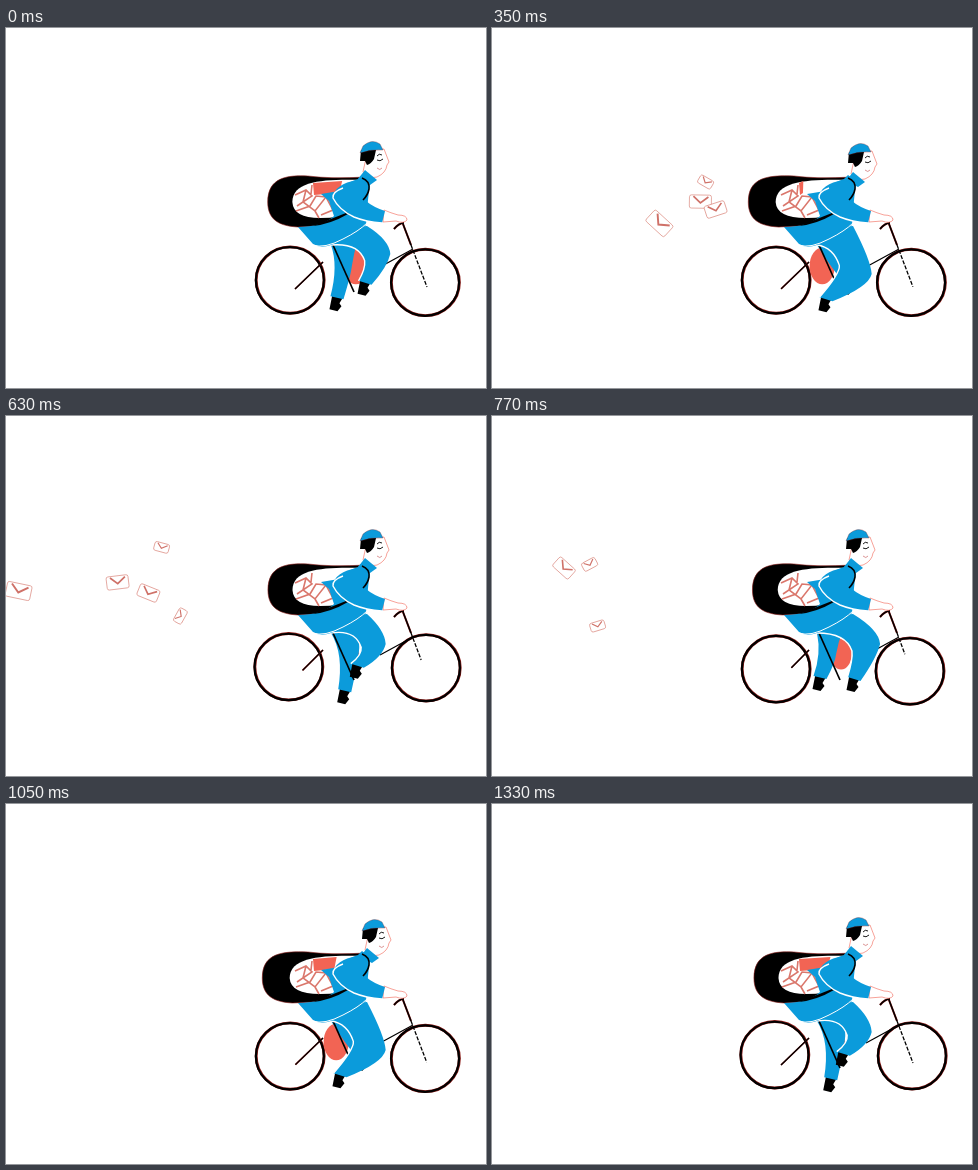
Recreate the animation shown at these times as an HTML page with a canvas. Size 480 px wide and 360 px high, loop 1400 ms.

```html
<!DOCTYPE html>
<html lang="en">
<head>
<meta charset="utf-8">
<title>Postman on a bicycle</title>
<style>
html, body { margin: 0; width: 100%; height: 100%; overflow: hidden; background: #fff; }
canvas { display: block; width: 480px; height: 360px; }
</style>
</head>
<body>
<canvas id="stage" width="480" height="360"></canvas>
<script>
const ctx = document.getElementById('stage').getContext('2d');
const STEP = 70, STEPS = 20, PEDAL_STEPS = 10;
const BLUE = '#0b9bdb', RED = '#f26454', BLACK = '#000', WHITE = '#fff', EDGE = '#8c1c18', PALE = '#dc8c82';
const DRAG = 0.6;

// Letters leave the bag with a speed, are slowed by drag and bent by "bend"; angles in degrees.
const LETTERS = [
  { born: 3, life: 9, x: 252, y: 172, vx: -43.5, vy: 17.3, bend: -2.8, size: 25, tilt: 58, spin: -7.7 },
  { born: 3, life: 7, x: 264, y: 200, vx: -29, vy: -17, bend: 1.9, size: 22, tilt: 5, spin: -2 },
  { born: 4, life: 5, x: 256, y: 186, vx: -33, vy: -4.5, bend: 0, size: 21, tilt: -18, spin: 0 },
  { born: 4, life: 5, x: 256, y: 172, vx: -43, vy: -18, bend: 0, size: 15, tilt: 30, spin: 0 },
  { born: 5, life: 8, x: 286, y: 191, vx: -35, vy: -30.5, bend: 3.9, size: 15, tilt: 101, spin: -21.5 },
  { born: 6, life: 9, x: 257, y: 183, vx: -40, vy: 4.3, bend: -2.1, size: 21, tilt: -8, spin: 10 },
  { born: 7, life: 9, x: 248, y: 190, vx: -38, vy: 5, bend: 0, size: 15, tilt: -105, spin: 22 }
];

function shape(d, fill, stroke, width = 1) {
  const path = new Path2D(d);
  if (fill) { ctx.fillStyle = fill; ctx.fill(path); }
  if (stroke) { ctx.strokeStyle = stroke; ctx.lineWidth = width; ctx.stroke(path); }
}

function ring(x, y, r, color, width) {
  ctx.beginPath();
  ctx.ellipse(x, y, r, r - 0.8, 0, 0, Math.PI * 2);
  ctx.strokeStyle = color;
  ctx.lineWidth = width;
  ctx.stroke();
}

// Cosine wave over the given period, at its peak when step equals peak.
function wave(step, period, peak) {
  return Math.cos((step - peak) / period * Math.PI * 2);
}

function pedal(step, cx, cy) {
  return [cx + 15.5 * wave(step, PEDAL_STEPS, 1), cy + 14 * wave(step, PEDAL_STEPS, 3.5)];
}

function wheel(x, y) {
  ring(x, y, 34, EDGE, 2.9);
  ring(x - 0.3, y + 0.2, 34, BLACK, 2.2);
}

function wheels(step) {
  wheel(283.2 + 1.2 * wave(step, 5, 0.5), 251.7 + 1.2 * wave(step, 5, 1));
  wheel(419 - 1.2 * wave(step, 5, 1.5), 253 + 2.2 * wave(step, 5, 0.7));
}

function letter({ born, life, x, y, vx, vy, bend, size, tilt, spin }, step) {
  const n = step - born;
  if (n < 0 || n >= life) return;
  const w = size, h = size * 0.6;
  ctx.save();
  ctx.translate(x + vx * n + DRAG * n * n, y + vy * n + bend * n * n);
  ctx.rotate((tilt + spin * n) * Math.PI / 180);
  ctx.beginPath();
  ctx.roundRect(-w / 2, -h / 2, w, h, 2);
  ctx.fillStyle = WHITE;
  ctx.fill();
  ctx.strokeStyle = PALE;
  ctx.lineWidth = 0.7;
  ctx.stroke();
  shape(`M${-w * .32} ${-h * .4}L0 ${h * .1}L${w * .36} ${-h * .36}`, null, '#cf7168', size / 13);
  ctx.restore();
}

function bikeFrame(step) {
  const retreat = 0.6 * Math.exp(-(((step - 10.5) / 2.5) ** 2));
  const backX = 289 + 18 * retreat, backY = 261 - 16 * retreat;
  const stemX = 421 - 14 * retreat, stemY = 259 - 36 * retreat;
  shape(`M${backX} ${backY}L317 234`, null, EDGE, 1.7);
  shape(`M${backX} ${backY}L317 234M374 239L407 221`, null, BLACK, 1.2);
  shape('M327 217L348 264', null, BLACK, 1.7);
  shape('M388 201Q393 195 398 195M397 196L405 217', null, EDGE, 2.1);
  shape('M388 201Q393 195 398 195M397 196L405 217', null, BLACK, 1.4);
  ctx.setLineDash([4, 1.5]);
  shape(`M405 217L${stemX} ${stemY}`, null, BLACK, 1.3);
  ctx.setLineDash([]);
}

function foot(x, y) {
  shape(`M${x - 4} ${y - 2}L${x + 6} ${y + 2}L${x + 3} ${y + 7}L${x + 5} ${y + 10}L${x + 1} ${y + 15}
    L${x - 7} ${y + 13}Z`, BLACK);
}

function redLining(step) {
  const show = wave(step, PEDAL_STEPS, 0.3);
  ctx.beginPath();
  ctx.ellipse(340 + 10 * show, 238, 13 * show * show, 19 * show * show, 0, 0, Math.PI * 2);
  ctx.fillStyle = RED;
  ctx.fill();
}

function farLeg(step) {
  const [x, y] = pedal(step + PEDAL_STEPS / 2, 343, 260);
  const knee = 359 + 15 * wave(step, PEDAL_STEPS, 5.8);
  foot(x, y);
  shape(`M325 217L351 214Q${knee + 2} 226 ${knee} 238Q${knee - 1} 247 ${x + 7} ${y + 3}L${x - 6} ${y}
    Q${Math.min(x + 2, 338)} 238 325 217Z`, BLUE);
}

function nearLeg(step) {
  const [x, y] = pedal(step, 346, 261);
  const frontX = 382 + 7.5 * wave(step, PEDAL_STEPS, 2);
  const frontY = 236 - 10 * wave(step, PEDAL_STEPS, 0);
  const backX = 353 + 7 * wave(step, PEDAL_STEPS, 1);
  const backY = 235 + 4 * wave(step, PEDAL_STEPS, 3.5);
  const back = `M325 217Q${backX - 6} ${backY - 18} ${backX} ${backY}Q${backX + 1} ${backY + 8} ${x - 6} ${y}`;
  foot(x, y);
  shape(`${back}L${x + 7} ${y + 4}Q${frontX - 3} ${frontY + 13} ${frontX} ${frontY}
    Q${frontX - 1} ${frontY - 14} 361 198L335 200Z`, BLUE);
  shape(back, null, WHITE, 1.4);
}

function bag(step) {
  const sway = wave(step, PEDAL_STEPS, -0.7);
  const left = 259 + 3 * sway, inner = 285 + 1.5 * sway;
  shape(`M360 149Q325 151 302 148C${left + 20} 147 ${left} 149 ${left} 174C${left} 193 ${left + 13} 198 ${left + 30} 199
    Q326 199 355 185L345 165Z`, BLACK, EDGE, 0.6);
  shape(`M358 152C320 151 ${inner} 152 ${inner} 174Q${inner + 1} 190 314 190Q335 190 345 184Z`, WHITE);
  const span = 14 + 18 * wave(step, STEPS, 18.2);
  if (span > 4) shape(`M307 155L${307 + span} 153L${307 + span * .9} 165L308 167Z`, RED);
  shape('M289 167L300 162L306 168L291 178M300 162L297 174L309 183L320 169L310 168L304 178L290 183M309 183L313 190M320 169L327 182L315 187M306 157L305 166',
    null, '#da776c', 1.6);
}

function body() {
  shape('M356 147L364 153L362 172L360 197Q344 210 325 217Q314 221 307 216L292 199Q316 199 328 188L323 173L315 166L333 163Q341 154 352 151Z', BLUE);
  shape('M307 217Q318 221 337 211Q353 203 361 195', null, WHITE, 1);
  shape('M342 186Q325 196 307 198L340 185Z', BLACK);
}

function arm() {
  shape('M378 182Q385 185 392 187Q401 187 401 192Q398 196 390 193L377 194Z', WHITE, RED, 0.6);
  shape('M351 152Q329 156 327 169Q332 181 348 189Q360 194 376 195L379 183Q367 179 360 173L364 158Z', BLUE);
  shape('M337 160Q326 164 327 170Q333 182 348 189Q360 194 376 195', null, WHITE, 1.4);
  shape('M356 150Q364 153 363 161Q362 167 357 172', null, BLACK, 1.6);
}

function head(step) {
  const nod = (1 - wave(step, PEDAL_STEPS, 0)) ** 2 / 2;
  ctx.save();
  ctx.translate(nod, nod);
  shape('M360 130L357 144Q365 151 371 149Q380 145 381 137L383 134L378 121L366 122Z', WHITE, RED, 0.6);
  shape('M359 142L371 152L364 157L352 151Z', BLUE);
  shape('M355 122L370 122L368 131Q365 136 361 137L359 133L354 133Z', BLACK);
  shape('M354 125L357 118Q366 110 374 116L377 122Q365 121 354 125Z', BLUE, EDGE, 0.3);
  shape('M371 128Q373 125 376 127M371 132Q374 134 377 131', null, BLACK, 0.9);
  shape('M371 140Q374 143 376 140', null, '#c66', 0.7);
  ctx.restore();
}

function draw(step) {
  ctx.fillStyle = WHITE;
  ctx.fillRect(0, 0, 480, 360);
  LETTERS.forEach(item => letter(item, step));
  wheels(step);
  redLining(step);
  farLeg(step);
  bikeFrame(step);
  nearLeg(step);
  bag(step);
  body();
  head(step);
  arm();
}

function tick(now) {
  draw(Math.floor(now / STEP) % STEPS);
  requestAnimationFrame(tick);
}
draw(0);
requestAnimationFrame(tick);
</script>
</body>
</html>
```
